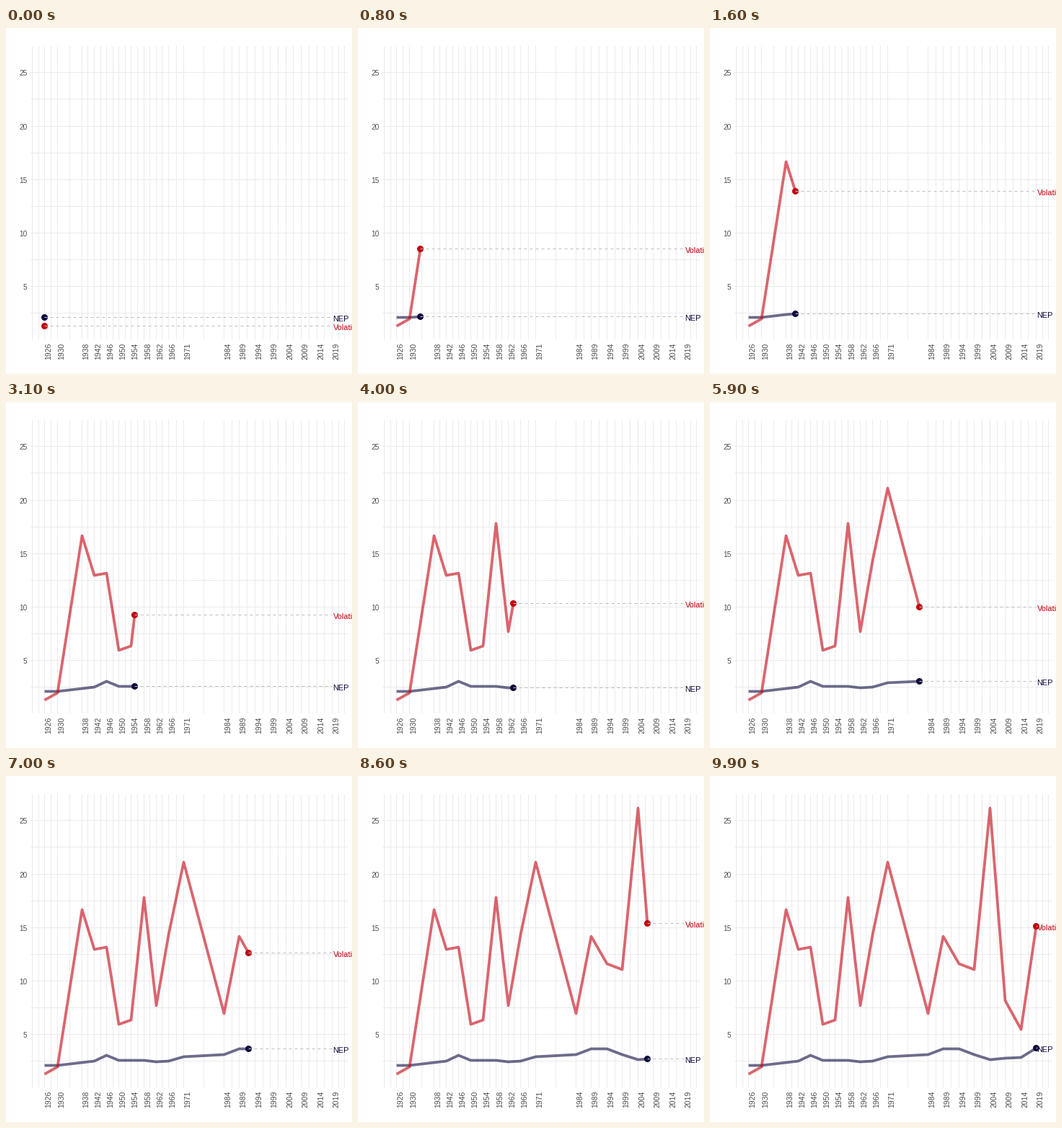
These frames come from a looping animation (480 by 480 pixels, 10 s). A matplotlib script:

```python
import numpy as np
import matplotlib.pyplot as plt
from matplotlib.animation import FuncAnimation
from matplotlib.patches import Circle

plt.rcParams["font.family"] = "Liberation Sans"

SIZE, DPI, FRAMES = 480, 100, 100
PX = 72 / DPI  # points per pixel
GRID, TICK, DASH = "#EBEBEB", "#4D4D4D", "#BEBEBE"

# Observations: every four years, later every five, with two gaps.
YEARS = np.r_[1926, 1930, 1938:1967:4, 1971, 1984:2020:5]
FIRST, LAST = YEARS[0], YEARS[-1]

# Turning points; the slow series is straight in between.
NEP_KNOTS = {1930: 2.1, 1942: 2.5, 1946: 3.05, 1950: 2.63, 1958: 2.62,
             1964: 2.38, 1971: 2.92, 1984: 3.12, 1989: 3.67, 1994: 3.67,
             2004: 2.67, 2014: 2.9, 2019: 3.77}
NEP = np.interp(YEARS, list(NEP_KNOTS), list(NEP_KNOTS.values()))
VOLATILITY = np.array([1.3, 2, 16.7, 13, 13.2, 6, 6.4, 17.8, 7.7, 14.3,
                       21.1, 7, 14.2, 11.6, 11.1, 26.2, 8.2, 5.5, 15.1])

# Each observation falls on a whole frame; motion is linear in between.
KEYS = np.round((YEARS - FIRST) / (LAST - FIRST) * (FRAMES - 1))


def to_pixel(v):
    return np.floor(v) + 0.5


def px(year):
    return to_pixel(53.98 + (np.asarray(year) - FIRST) * 4.285)


def py(value):
    return to_pixel(61.85 + (25 - np.asarray(value)) * 14.85)


X_END = px(LAST)

fig = plt.figure(figsize=(SIZE / DPI, SIZE / DPI), dpi=DPI, facecolor="white")
ax = fig.add_axes([0, 0, 1, 1])
ax.set_xlim(0, SIZE)
ax.set_ylim(SIZE, 0)
ax.axis("off")


def stroke(xs, ys, color, width, **style):
    line, = ax.plot(xs, ys, color=color, lw=width * PX, snap=False,
                    solid_capstyle="butt", dash_capstyle="butt", **style)
    return line


def draw_grid():
    mids = (YEARS[1:] + YEARS[:-1]) / 2
    margins = [FIRST - 4, FIRST - 2, LAST + 2, LAST + 4]
    for x in px(np.r_[YEARS, mids, margins]):
        stroke([x, x], [25, 432], GRID, 1, zorder=0)
    for y in py(np.arange(2.5, 26, 2.5)):
        stroke([34, 474], [y, y], GRID, 1, zorder=0)
    for v in range(5, 26, 5):
        ax.text(29.5, py(v) + 4.5, str(v), color=TICK, size=10 * PX,
                ha="right", va="baseline")
    for year in YEARS:
        ax.text(px(year) + 6, 448.5, str(year), color=TICK, size=10.4 * PX,
                rotation=90, ha="center", va="center")


class Series:
    def __init__(self, name, values, color, z):
        self.values = values
        self.line = stroke([], [], color, 3.8, alpha=0.6, zorder=1 + z,
                           solid_joinstyle="round")
        self.dot = ax.add_patch(Circle((0, 0), 4.5, color=color, lw=0,
                                       snap=False, zorder=3 + z))
        self.lead = stroke([], [], DASH, 1, linestyle=(0, (4, 4)), zorder=5)
        self.label = ax.text(X_END + 1, 0, name, color=color, size=11 * PX,
                             ha="left", va="baseline", zorder=6)

    def update(self, frame):
        x = px(np.interp(frame, KEYS, YEARS))
        y = py(np.interp(frame, KEYS, self.values))
        past = KEYS < frame
        self.line.set_data(np.append(px(YEARS[past]), x),
                           np.append(py(self.values[past]), y))
        self.dot.center = (x, y)
        self.lead.set_data([x, max(X_END, x + 2)], [y, y])
        self.label.set_y(y + 5.5)


draw_grid()
series = [Series("NEP", NEP, "#0C0A3E", 0),
          Series("Volatility", VOLATILITY, "#C2000F", 0.5)]


def update(frame):
    for s in series:
        s.update(frame)
    return []


anim = FuncAnimation(fig, update, frames=FRAMES, interval=100, repeat=True,
                     repeat_delay=0, blit=False)
plt.show()
```
